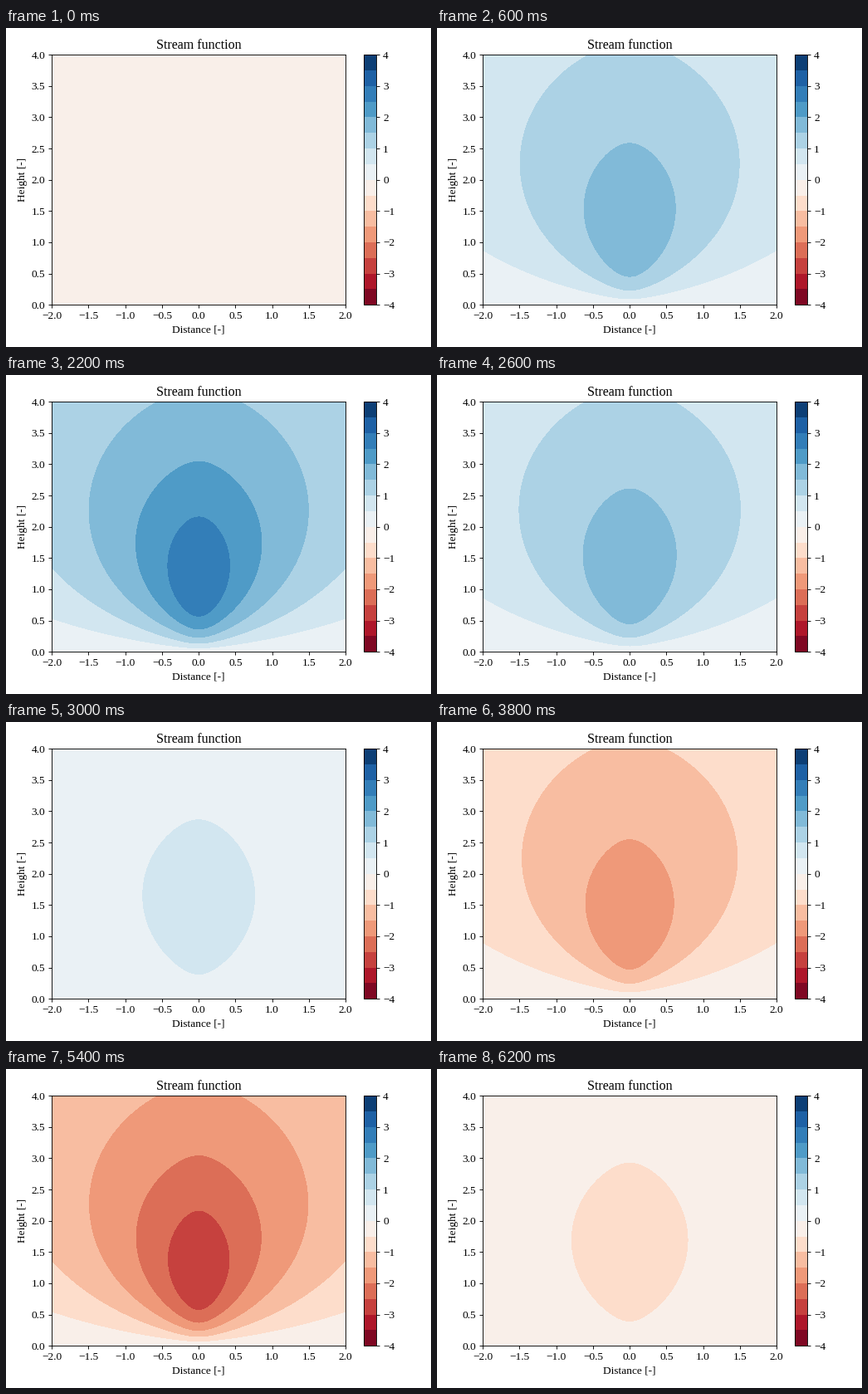
Write a matplotlib script that moves like this. It is 512 px wide and 384 px high and loops after 6.4 s.

```python
import numpy as np
import matplotlib.pyplot as plt
from matplotlib.animation import FuncAnimation

WIDTH, HEIGHT, DPI = 512, 384, 80
FRAMES, INTERVAL = 32, 200
PHASE_STEP = 0.1961          # radians per frame
AMPLITUDE = 7.235
FRONT_WIDTH = 0.2            # horizontal scale of the heating
LEVELS = np.arange(-4, 4.5, 0.5)

plt.rcParams.update({"font.family": "Liberation Serif", "font.size": 12})


def circulation(x, z):
    """Response to heating that decays with height, as a cosine integral."""
    dk = 0.02
    k = np.arange(dk / 2, 40, dk)
    weight = AMPLITUDE * dk * np.exp(-FRONT_WIDTH * k) / (1 - k**2)
    vertical = np.exp(-np.outer(z, k)) - np.exp(-z)[:, None]
    return (vertical * weight) @ np.cos(np.outer(k, x))


def pixel_axes(fig, left, top, right, bottom):
    return fig.add_axes([left / WIDTH, 1 - bottom / HEIGHT,
                         (right - left) / WIDTH, (bottom - top) / HEIGHT])


x = np.linspace(-2, 2, 101)
z = np.linspace(0, 4, 101)
pattern = circulation(x, z)

fig = plt.figure(figsize=(WIDTH / DPI, HEIGHT / DPI), dpi=DPI)
ax = pixel_axes(fig, 55.25, 32.1, 409.1, 333.3)
cax = pixel_axes(fig, 431.2, 32.1, 446.25, 333.3)


def draw_field(frame):
    return ax.contourf(x, z, pattern * np.sin(frame * PHASE_STEP),
                       levels=LEVELS, cmap="RdBu")


field = draw_field(0)
fig.colorbar(field, cax=cax, ticks=range(-4, 5))
ax.set(title="Stream function", xlabel="Distance [-]", ylabel="Height [-]",
       xlim=(-2, 2), ylim=(0, 4),
       xticks=np.arange(-2, 2.5, 0.5), yticks=np.arange(0, 4.5, 0.5))


def update(frame):
    global field
    field.remove()
    field = draw_field(frame)
    return [field]


anim = FuncAnimation(fig, update, frames=FRAMES, interval=INTERVAL,
                     repeat=True, repeat_delay=0)
plt.show()
```
